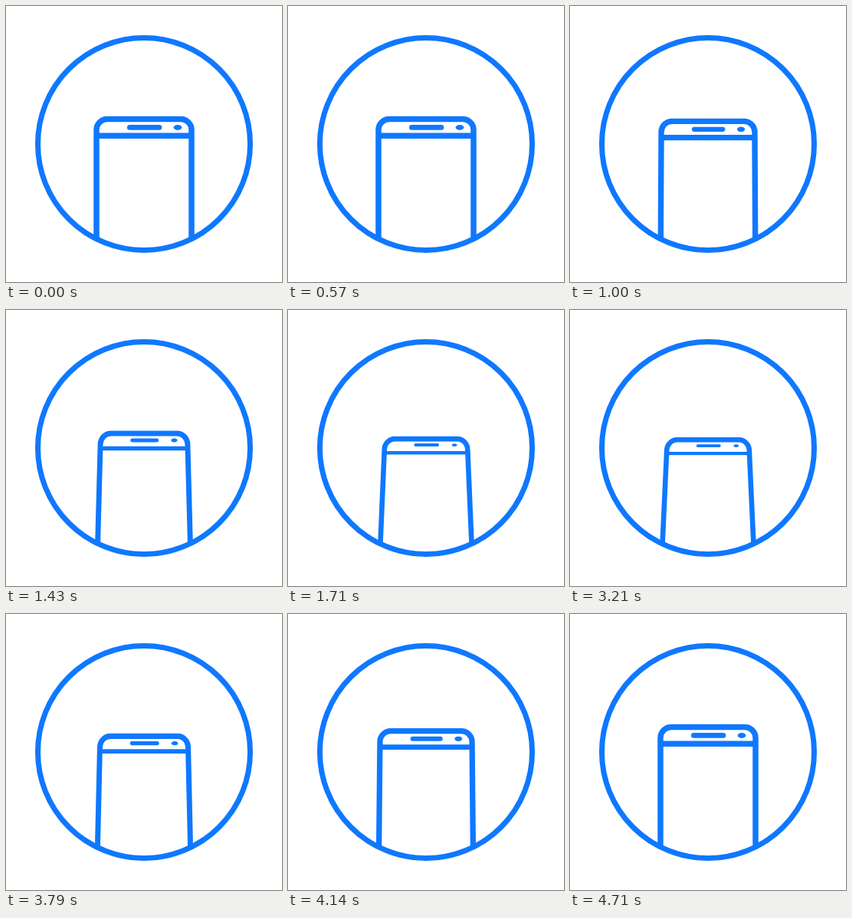
Animation of 360 by 360 pixels, one loop 4780 ms. Source, as an HTML page:

```html
<!DOCTYPE html>
<html lang="en">
<head>
<meta charset="utf-8">
<title>Tilting phone</title>
<style>
  html, body { margin: 0; width: 100%; height: 100%; overflow: hidden; background: #fff; }
  svg { display: block; width: 100vw; height: 100vh; }
</style>
</head>
<body>
<svg viewBox="0 0 360 360" fill="none" stroke="#0f78ff">
  <clipPath id="disc"><circle cx="180" cy="180" r="139"/></clipPath>
  <g clip-path="url(#disc)">
    <path id="body"/>
    <path id="divider"/>
    <path id="speaker" stroke-linecap="round"/>
    <ellipse id="lens" fill="#0f78ff" stroke="none"/>
  </g>
  <circle cx="180" cy="180" r="138.5" stroke-width="7"/>
</svg>
<script>
  const LOOP = 4780, STEP = LOOP / 67;
  const TILT = [720, 2020], RETURN = [2870, 4680];
  const [body, divider, speaker, lens] =
    ['body', 'divider', 'speaker', 'lens'].map(id => document.getElementById(id));

  const ease = (t, [from, to]) => {
    const x = Math.min(1, Math.max(0, (t - from) / (to - from)));
    return x * x * (3 - 2 * x);
  };

  function set(el, attrs) {
    for (const name in attrs) el.setAttribute(name, attrs[name]);
  }

  // p: 0 = upright, 1 = leaning back
  function draw(p) {
    const mix = (a, b) => a + (b - a) * p;
    const top = mix(147.5, 171.5);
    const shoulder = mix(161.5, 186);
    const half = mix(62, 53);
    const foot = mix(62, 59.5);
    const curve = mix(14, 13.5);
    const l = 180 - half, r = 180 + half;
    const k = 0.45;

    set(body, {
      d: `M${180 - foot} 312L${l} ${shoulder}` +
         `C${l} ${top + (shoulder - top) * k} ${l + curve * k} ${top} ${l + curve} ${top}` +
         `H${r - curve}` +
         `C${r - curve * k} ${top} ${r} ${top + (shoulder - top) * k} ${r} ${shoulder}` +
         `L${180 + foot} 312`,
      'stroke-width': mix(7.5, 6.5)
    });

    set(divider, {
      d: `M${l} ${mix(169.3, 189)}H${r}`,
      'stroke-width': mix(7.5, 4)
    });

    const y = mix(158.4, 179), w = mix(6.6, 3.6);
    set(speaker, {
      d: `M${mix(158, 165.5) + w / 2} ${y}H${mix(203.3, 196) - w / 2}`,
      'stroke-width': w
    });

    set(lens, { cx: mix(224, 216), cy: y, rx: mix(5.4, 3), ry: mix(3.5, 1.7) });
  }

  function tick() {
    const t = Math.floor((performance.now() % LOOP + 5) / STEP) * STEP;
    draw(ease(t, TILT) - ease(t, RETURN));
    requestAnimationFrame(tick);
  }
  tick();
</script>
</body>
</html>
```
